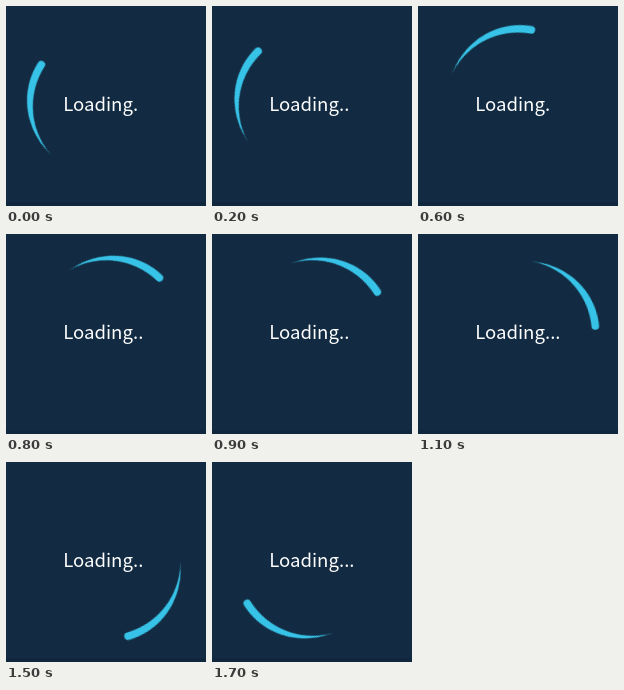
An HTML page for the animation above (1800 ms loop, 200 by 200 pixels).

```html
<!DOCTYPE html>
<html lang="en">
<head>
<meta charset="utf-8">
<title>Loading</title>
<style>
  html, body { margin: 0; width: 100%; height: 100%; overflow: hidden; background: #122b42; }
  svg { display: block; width: 100vw; height: 100vh; }
  text { font: 18.6px "Noto Sans CJK SC", "Noto Sans CJK JP", "Noto Sans", sans-serif; fill: #fff; }
  #arc { fill: #37c3e8; transform-origin: 100.5px 100px; }
</style>
</head>
<body>
<svg viewBox="0 0 200 200">
  <rect width="200" height="200" fill="#122b42"/>
  <rect y="196" width="200" height="4" fill="#10263d"/>
  <path id="arc"/>
  <text x="57.2" y="105">Loading.<tspan id="dot2">.</tspan><tspan id="dot3">.</tspan></text>
</svg>
<script>
const CX = 100.5, CY = 100;
const INNER = 73.4, THICK = 7.6, SPAN = 73.5;
const STEP = 100, HEAD = 199.6;

// Turn in degrees at each step: steady at first, then accelerating to a full circle.
const TURN = [0, 12.8, 25.6, 39, 52.6, 66.2, 80, 97, 113.7,
              127.5, 141, 154.5, 166.5, 186, 209, 234.2, 269, 308];

const $ = id => document.getElementById(id);

function point(r, deg) {
  const a = deg * Math.PI / 180;
  return (CX + r * Math.cos(a)).toFixed(2) + ' ' + (CY + r * Math.sin(a)).toFixed(2);
}

// Tapered stroke: pointed tail at -SPAN degrees, round head at 0.
function cometPath() {
  const outer = [], inner = [], n = 36;
  for (let i = 0; i <= n; i++) {
    const u = i / n, deg = (u - 1) * SPAN;
    const width = THICK * Math.sin(u * Math.PI / 2) ** 1.15;
    const base = INNER + 0.5 * (1 - u);
    outer.push(point(base + width, deg));
    inner.unshift(point(base, deg));
  }
  const cap = THICK / 2;
  return `M${outer.join('L')}A${cap} ${cap} 0 0 1 ${inner.join('L')}Z`;
}

function hold(el, frames, duration) {
  const anim = el.animate(frames.map(f => ({ ...f, easing: 'step-end' })),
                          { duration, iterations: Infinity });
  anim.startTime = document.timeline.currentTime;
}

$('arc').setAttribute('d', cometPath());

const turns = [...TURN, 360].map((deg, i) => ({
  offset: i / TURN.length,
  transform: `rotate(${HEAD + deg}deg)`
}));
hold($('arc'), turns, TURN.length * STEP);

['dot2', 'dot3'].forEach((id, i) => hold($(id), [
  { offset: 0, fillOpacity: 0 },
  { offset: (i + 1) / 3, fillOpacity: 1 },
  { offset: 1, fillOpacity: 1 }
], 6 * STEP));
</script>
</body>
</html>
```
